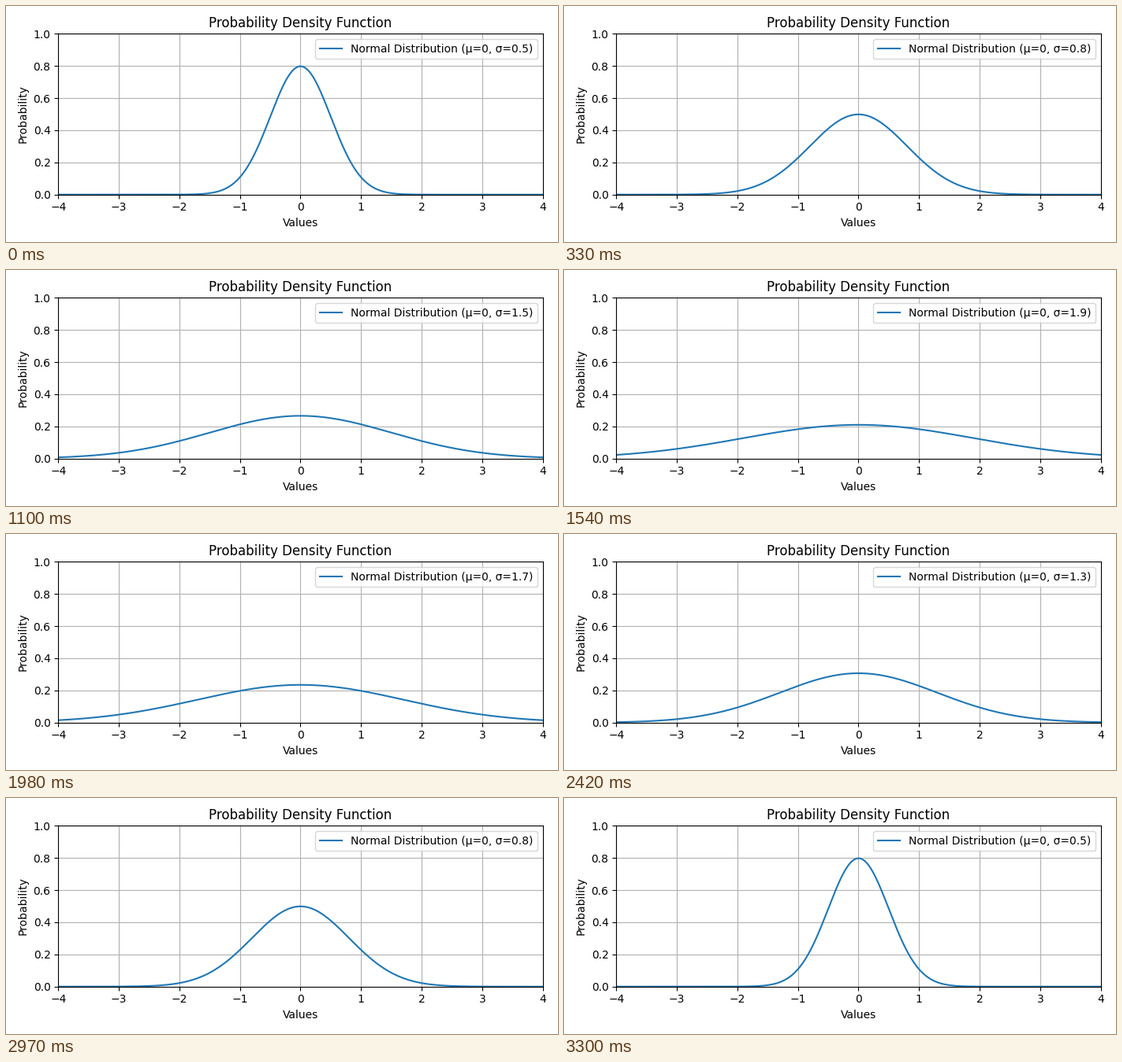
Recreate the animation shown at these times as a matplotlib script. Size 700x300 px, loop 3.41 s.

```python
import numpy as np
import matplotlib.pyplot as plt
from matplotlib.animation import FuncAnimation

FRAMES = 31
INTERVAL = 110  # ms
HEIGHT = 300  # px
AXES_TOP, AXES_BOTTOM = 35.33, 239.72  # px from the top edge
MU = 0
SIGMA_MAX = 2.0
SIGMA_STEP = 0.1

x = np.linspace(-4, 4, 1000)


def sigma_at(i):
    """Widen to the maximum at mid-loop, then narrow again."""
    return SIGMA_MAX - SIGMA_STEP * abs(i - FRAMES // 2)


def pdf(x, mu, sigma):
    return np.exp(-0.5 * ((x - mu) / sigma) ** 2) / (sigma * np.sqrt(2 * np.pi))


def label(sigma):
    return f"Normal Distribution (μ={MU}, σ={sigma:.1f})"


fig, ax = plt.subplots(figsize=(7, HEIGHT / 100), dpi=100)
start = sigma_at(0)
line, = ax.plot(x, pdf(x, MU, start), label=label(start))
ax.set(xlim=(-4, 4), ylim=(0, 1), title="Probability Density Function",
       xlabel="Values", ylabel="Probability")
ax.grid(True)
legend_text = ax.legend(loc="upper right").get_texts()[0]
fig.tight_layout()
fig.subplots_adjust(top=1 - AXES_TOP / HEIGHT, bottom=1 - AXES_BOTTOM / HEIGHT)


def update(i):
    sigma = sigma_at(i)
    line.set_ydata(pdf(x, MU, sigma))
    legend_text.set_text(label(sigma))
    return line, legend_text


anim = FuncAnimation(fig, update, frames=FRAMES, interval=INTERVAL,
                     repeat=True, repeat_delay=0)
plt.show()
```
